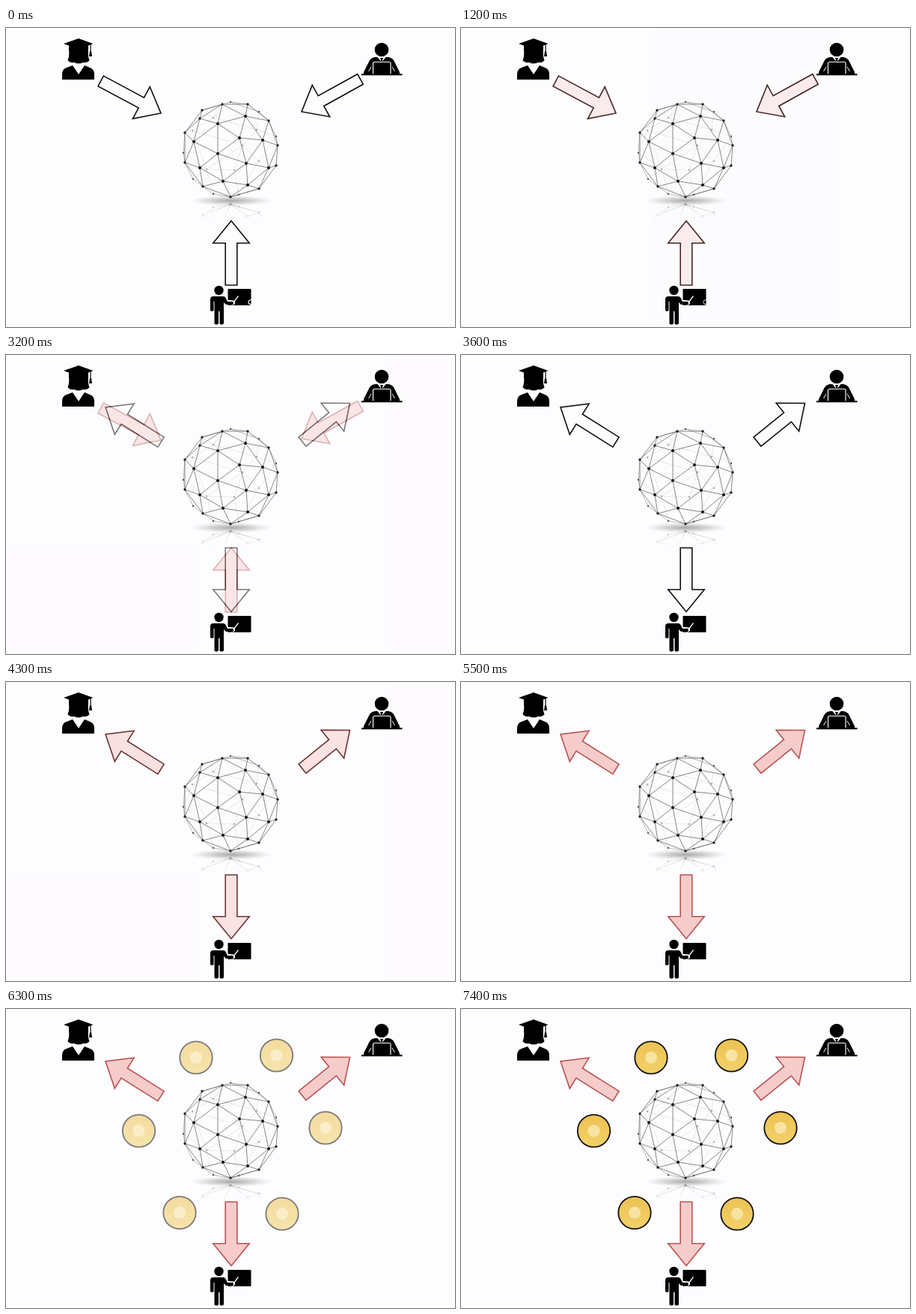
Recreate the animation shown at these times as an HTML page. Size 600x400 px, loop 7500 ms.

```html
<!DOCTYPE html>
<html lang="en">
<head>
<meta charset="utf-8">
<title>Network exchange</title>
<style>
  html, body { margin: 0; width: 100%; height: 100%; overflow: hidden; background: #fdfcfe; }
  svg { display: block; width: 600px; height: 400px; }
  .bg { fill: #fdfcfe; }
  .arrow { stroke-width: 1.6; stroke-linejoin: miter; }
  .plain .arrow { fill: #fdfcfe; stroke: #111; }
  .pink .arrow { fill: #f6cccb; stroke: #b85450; }
  .paper { fill: none; stroke: #fdfcfe; }

  .fade { opacity: 0; animation: 7500ms infinite; }
  #inPink { animation-name: inPink; }
  #outPlain { animation-name: outPlain; }
  #outPink { animation-name: outPink; }
  #coins { animation-name: coins; }
  #curl { animation-name: curl; }

  /* Each dissolve runs in eight 100 ms steps */
  @keyframes inPink {
    0% { opacity: 0; }
    13.333% { opacity: 0; animation-timing-function: steps(8, jump-both); }
    24%, 100% { opacity: 1; }
  }
  @keyframes outPlain {
    0% { opacity: 0; }
    37.333% { opacity: 0; animation-timing-function: steps(8, jump-both); }
    48%, 100% { opacity: 1; }
  }
  @keyframes outPink {
    0% { opacity: 0; }
    52% { opacity: 0; animation-timing-function: steps(8, jump-both); }
    62.666%, 100% { opacity: 1; }
  }
  @keyframes coins {
    0% { opacity: 0; }
    78.666% { opacity: 0; animation-timing-function: steps(8, jump-both); }
    89.333%, 100% { opacity: 1; }
  }
  @keyframes curl {
    0% { opacity: 1; }
    13.333% { opacity: 1; animation-timing-function: steps(8, jump-both); }
    24%, 100% { opacity: 0; }
  }
</style>
</head>
<body>
<svg viewBox="0 0 600 400">
  <defs>
    <linearGradient id="gold" x1="0" y1="0" x2="0" y2="1">
      <stop offset="0" stop-color="#ecc253"/>
      <stop offset="1" stop-color="#f3d169"/>
    </linearGradient>
    <radialGradient id="shade">
      <stop offset="0" stop-color="#777" stop-opacity=".65"/>
      <stop offset=".5" stop-color="#999" stop-opacity=".4"/>
      <stop offset="1" stop-color="#bbb" stop-opacity="0"/>
    </radialGradient>
    <linearGradient id="dim" gradientUnits="userSpaceOnUse" x1="0" y1="234" x2="0" y2="256">
      <stop offset="0" stop-color="#fff" stop-opacity=".4"/>
      <stop offset="1" stop-color="#fff" stop-opacity="0"/>
    </linearGradient>
    <mask id="mirror" maskUnits="userSpaceOnUse" x="220" y="232" width="160" height="26">
      <rect x="220" y="232" width="160" height="26" fill="url(#dim)"/>
    </mask>
  </defs>

  <g id="inPlain" class="plain"></g>
  <g id="inPink" class="pink fade"></g>
  <g id="outPlain" class="plain fade"></g>
  <g id="outPink" class="pink fade"></g>

  <ellipse cx="301" cy="231" rx="56" ry="7" fill="url(#shade)"/>
  <g mask="url(#mirror)"><use href="#globe" transform="translate(0 462) scale(1 -1)"/></g>
  <g id="globe"></g>

  <g id="student">
    <path d="M97 14 116.500 21 110 23.500V29Q109 37 111.500 43.500 108 47 103 46Q97 49 91 46 86 47 82.500 43.500 85 37 84 29V23.500L77 21Z"/>
    <path d="M113 22V32" stroke="#000" stroke-width="1.200"/>
    <path d="M112 31h2l1 7h-4z"/>
    <path d="M75 69V62Q75 55 81 53L89 50 97 62 105 50 112 53Q118 55 118 62V69Z"/>
  </g>

  <g id="worker">
    <circle cx="502" cy="29" r="9.300"/>
    <path d="M493 39H511Q517 40 519 45L526 59V62H478V59L485 45Q487 40 493 39Z"/>
    <path d="M496 38.500 502 46 508 38.500Z" fill="#fdfcfe"/>
    <path d="M500 40h4l-1 3 1 4h-4l1-4z"/>
    <rect x="490.500" y="45.500" width="23.500" height="17" rx="2" stroke="#fdfcfe" stroke-width="1.200"/>
    <path class="paper" d="M484.500 58 488 52M519.500 58 516 52" stroke-width="1"/>
    <rect x="475" y="61.300" width="54.500" height="2"/>
  </g>

  <g id="teacher">
    <rect x="296.500" y="349" width="31" height="22" rx="1"/>
    <path class="paper" d="M303 368.500 310.500 358.500" stroke-width="1.300"/>
    <path class="paper" d="M293 366.500 303 367.500" stroke-width="6" stroke-linecap="round"/>
    <circle cx="284.500" cy="351" r="6.200"/>
    <path d="M277 359H290Q293 359 294 362L296 366H303Q305 368 303 370H294L291 367V395.500Q288 398 285.500 395.500V379H284V395.500Q281 398 278.500 395.500V366H277.500V378Q275 380 273 378V363Q273 359 277 359Z"/>
    <path id="curl" class="paper fade" d="M328 363.500Q323.500 364 324 367.500 325 370 328 370" stroke-width="1.200"/>
  </g>

  <g id="coins" class="fade"></g>
</svg>
<script>
  const put = (id, markup) => { document.getElementById(id).innerHTML = markup; };

  function arrow([x1, y1, x2, y2]) {
    const length = Math.hypot(x2 - x1, y2 - y1);
    const ux = (x2 - x1) / length, uy = (y2 - y1) / length;
    const neck = length - 29.7;
    const at = (along, side) =>
      `${(x1 + ux * along - uy * side).toFixed(2)},${(y1 + uy * along + ux * side).toFixed(2)}`;
    const points = [at(0, -7.8), at(neck, -7.8), at(neck, -24.2), at(length, 0),
                    at(neck, 24.2), at(neck, 7.8), at(0, 7.8)];
    return `<polygon class="arrow" points="${points.join(' ')}"/>`;
  }

  const inward = [[126.700, 71, 207, 114], [473.500, 68.500, 395, 112], [301, 344, 301, 258]];
  const outward = [[207, 116.500, 133, 70], [396, 116, 459.500, 64.500], [301, 258, 301, 343.500]];
  const slide = list => '<rect class="bg" width="600" height="400"/>' + list.map(arrow).join('');
  put('inPlain', slide(inward));
  put('inPink', slide(inward));
  put('outPlain', slide(outward));
  put('outPink', slide(outward));

  // Globe: upper case on the rim, a-k in front, l-r behind
  const names = 'ABDEGHIKMOQR' + 'CFJLNPS' + 'abcdefghijk' + 'lmnopqr';
  const places = [
    262, 110, 289, 102, 323, 102, 351, 124, 363, 157, 361, 184,
    338, 215, 300, 226, 263, 212, 239, 180, 239, 140, 259, 121,
    300, 99, 361, 145, 311, 223, 277, 222, 250, 202, 237, 167, 338, 112,
    283, 128, 320, 118, 251, 152, 312, 147, 343, 150, 283, 168,
    321, 181, 351, 187, 259, 187, 290, 205, 323, 210,
    277, 120, 316, 157, 249, 137, 268, 189, 335, 136, 305, 190, 338, 178
  ];
  const node = {};
  [...names].forEach((name, i) => { node[name] = places.slice(2 * i, 2 * i + 2); });

  const front = 'AB BD DE EG GH HI IK KM MO OQ QA AR RB RQ Ra Ba Bb Db bE ab ac ad bd be Ee ' +
    'Qc Rc cO ci cf af df de dg eg eG eh Gh hH gh fg fi fj Oi iM ij gj gk hk jk jM jK kK kI hI';
  const rim = 'AC CD CS SE EF FG JI JK LK LM NM NO PO PQ';
  const back = 'Cl ln nP lm mp Sp pF mo oP oN oL oq qm qJ qr rF rJ mr no nm Al Bl lp';

  const lines = (pairs, color, width) => `<path fill="none" stroke="${color}" stroke-width="${width}" d="` +
    pairs.split(' ').map(([a, b]) => `M${node[a]}L${node[b]}`).join('') + '"/>';
  const dots = (keys, r, color) => [...keys].map(key =>
    `<circle cx="${node[key][0]}" cy="${node[key][1]}" r="${r}" fill="${color}"/>`).join('');

  put('globe',
    lines(back, '#dcdcdc', 0.6) + dots('lmnopqr', 1.2, '#aaa') +
    lines(rim, '#888', 0.6) + lines(front, '#555', 0.7) +
    dots('CFJLNPS', 1.2, '#555') + dots('ABDEGHIKMOQR', 1.7, '#222') + dots('abcdefghijk', 2, '#111'));

  const coinSpots = [[254, 65], [361.5, 62], [177.5, 163], [427, 159], [232, 272.5], [369, 274]];
  put('coins', coinSpots.map(([x, y]) =>
    `<circle cx="${x}" cy="${y}" r="21.700" fill="url(#gold)" stroke="#111" stroke-width="1.800"/>` +
    `<circle cx="${x}" cy="${y}" r="8" fill="#f8e4a2"/>`).join(''));
</script>
</body>
</html>
```
